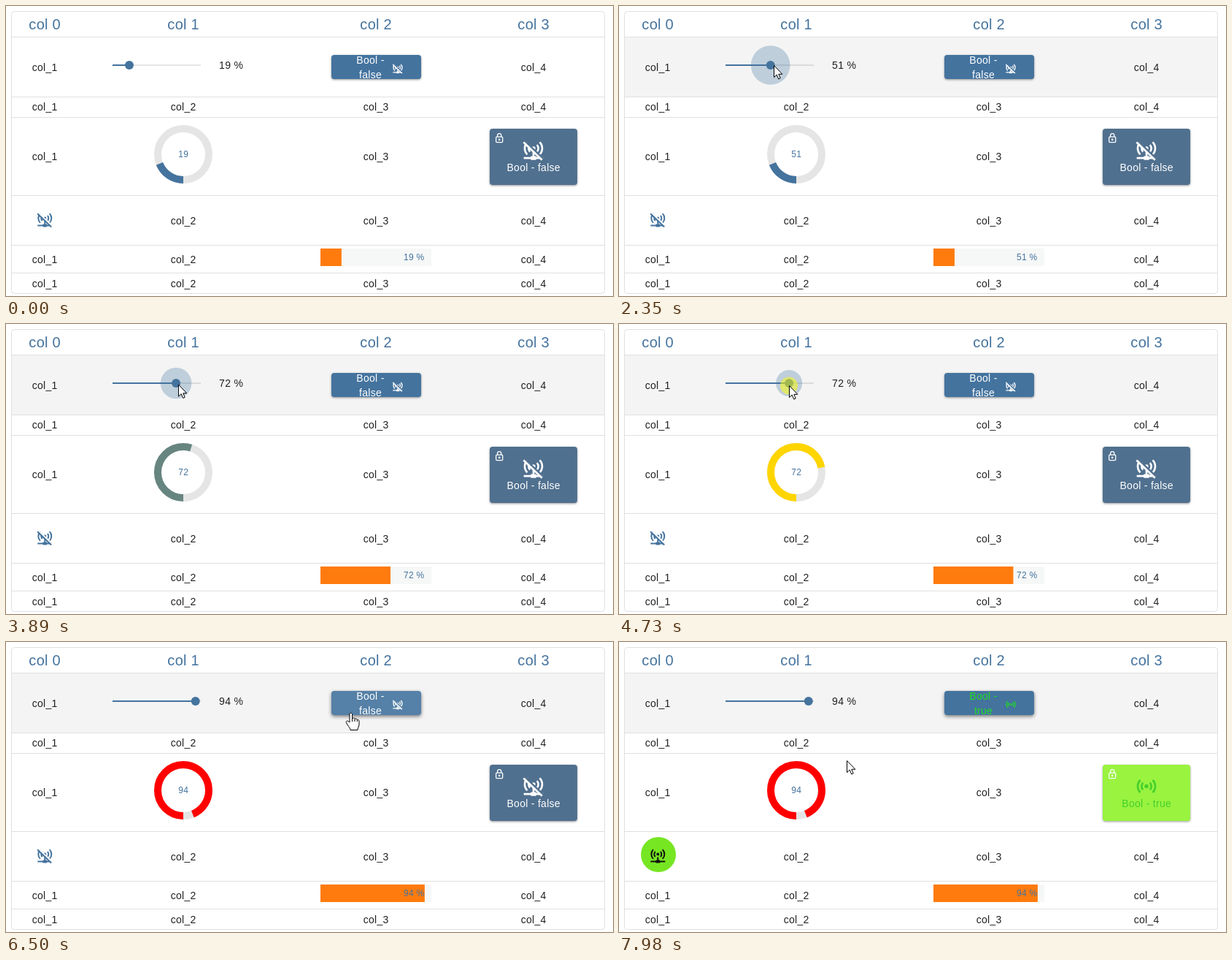
Recreate the animation shown at these times as an HTML page. Size 832x397 px, loop 8000 ms.

```html
<!DOCTYPE html>
<html>
<head>
<meta charset="utf-8">
<style>
html, body { margin: 0; width: 100%; height: 100%; overflow: hidden; background: #fff; }
svg { display: block; width: 832px; height: 397px; }
text { font: 14px "Liberation Sans", Arial, sans-serif; letter-spacing: .28px; fill: #212121; text-anchor: middle; }
.head { font-size: 20px; fill: #44739e; }
.small { font-size: 12px; fill: #44739e; }
.button text { fill: currentColor; }
.button { color: #fff; }
.button > rect:first-child { filter: drop-shadow(0 1px 1.5px rgba(0,0,0,.4)); }
.raised > rect:first-child { filter: drop-shadow(0 2px 2.5px rgba(0,0,0,.5)); }
</style>
</head>
<body>
<svg viewBox="0 0 832 397">
  <defs>
    <g id="waves" fill="none" stroke="currentColor" stroke-width="2">
      <path d="M5.64 3.64A9 9 0 0 0 5.64 16.36M18.36 3.64A9 9 0 0 1 18.36 16.36M8.46 6.46A5 5 0 0 0 8.46 13.54M15.54 6.46A5 5 0 0 1 15.54 13.54"/>
      <circle cx="12" cy="10" r="2" fill="currentColor" stroke="none"/>
    </g>
    <g id="network">
      <use href="#waves"/>
      <path d="M11 14V18H10A1 1 0 0 0 9 19H2V21H9A1 1 0 0 0 10 22H14A1 1 0 0 0 15 21H22V19H15A1 1 0 0 0 14 18H13V14Z" fill="currentColor"/>
    </g>
    <mask id="gap" maskUnits="userSpaceOnUse" x="0" y="0" width="24" height="24">
      <rect width="24" height="24" fill="#fff"/>
      <path d="M3 2.5L23 21.5" stroke="#000" stroke-width="2"/>
    </mask>
    <g id="off">
      <use href="#network" mask="url(#gap)"/>
      <path d="M1.8 3.7L20.8 22" stroke="currentColor" stroke-width="2"/>
    </g>
    <g id="on"><use href="#waves" y="2"/></g>
  </defs>

  <rect id="hoverRow" x="8" width="812" fill="#f4f4f4"/>
  <g id="table" fill="none" stroke="#e0e0e0">
    <rect x="7.5" y="7.5" width="813" height="386" rx="4"/>
    <path d="M8 42.5H820M8 124.5H820M8 152.5H820M8 259.5H820M8 327.5H820M8 365.5H820"/>
  </g>
  <g id="labels"></g>

  <rect x="146" y="80" width="121" height="2" fill="#000" opacity=".1"/>
  <rect id="track" x="146" y="80" height="2" fill="#44739e"/>
  <circle id="halo" cy="81" fill="#44739e" opacity=".3"/>
  <circle id="thumb" cy="81" r="6" fill="#44739e"/>
  <text id="sliderText" x="308.6" y="86"></text>

  <g id="toggle" class="button">
    <rect x="446" y="67" width="123" height="33" rx="4" fill="#44739e"/>
    <rect id="tint" x="446" y="67" width="123" height="33" rx="4" fill="#fff" opacity=".09"/>
    <circle id="ripple" cx="473" cy="97" fill="#fff" clip-path="inset(0)"/>
    <text x="499.5" y="79">Bool -</text>
    <text class="state" x="499.5" y="99"></text>
    <use class="icon" transform="translate(529 77.5) scale(.667)"/>
  </g>

  <circle cx="243" cy="203" r="35" fill="none" stroke="#e5e5e5" stroke-width="10"/>
  <circle id="gauge" cx="243" cy="203" r="35" fill="none" stroke-width="10" pathLength="100" transform="rotate(90 243 203)"/>
  <text id="gaugeText" class="small" x="243.3" y="207"></text>

  <g id="card" class="button">
    <rect id="cardBack" x="663" y="168" width="120" height="77" rx="4"/>
    <g fill="none" stroke="#fff" stroke-width="1.3">
      <rect x="671.7" y="179.2" width="9" height="7.4" rx="1"/>
      <path d="M673.6 179V177.2a2.6 2.6 0 0 1 5.2 0V179"/>
      <circle cx="676.2" cy="182.9" r=".7" fill="#fff"/>
    </g>
    <use class="icon" transform="translate(707 181.5) scale(1.333)"/>
    <text class="state" x="723.2" y="226"></text>
  </g>

  <circle id="lamp" cx="54" cy="291" r="24" fill="#76e622"/>
  <use id="lampIcon" transform="translate(41.3 280.5)"/>

  <rect x="431" y="332" width="152" height="24" fill="#f6f7f7"/>
  <rect id="bar" x="431" y="332" height="24" fill="#ff7b0d"/>
  <text id="barText" class="small" x="573.5" y="348" style="text-anchor:end"></text>

  <circle id="press" r="12" fill="#ff0" opacity=".5"/>
  <g id="cursor" fill="#fff" stroke="#000" stroke-linejoin="round">
    <path id="arrow" d="M.5 .5V16.6L4.2 13.1L6.7 19L9.2 17.9L6.8 12.3H11.8Z"/>
    <path id="hand" d="M-2 13V2C-2 -.2 1.6 -.2 1.6 2V8C2 6.5 5 6.7 5 8.6C5.5 7.4 8.3 7.8 8.3 9.7C9 8.8 11 9.3 11 11.5V16C11 19 9 20 9 23.5H-1C-1 21 -3 19.5 -4.5 17L-6.6 13.6C-7.5 11.5 -5 10.2 -3.6 11.7Z M1.6 8V12M5 9V12M8.3 10V12"/>
  </g>
</svg>
<script>
const $ = id => document.getElementById(id);
const set = (el, attrs) => { for (const k in attrs) el.setAttribute(k, attrs[k]); };
const columns = [53.2, 243.2, 507.2, 723.2];
const rowEdges = [43, 125, 153, 260, 328, 366, 393];
const baselines = [89, 143, 211, 299, 352, 385];
const widgets = ['0,1', '0,2', '2,1', '2,3', '3,0', '4,2'];

let labels = columns.map((x, c) => `<text class="head" x="${x}" y="32">col ${c}</text>`).join('');
baselines.forEach((y, r) => columns.forEach((x, c) => {
  if (!widgets.includes(`${r},${c}`)) labels += `<text x="${x}" y="${y}">col_${c + 1}</text>`;
}));
$('labels').innerHTML = labels;

// Each key is [time, value, value...]; values between keys are linear.
function tween(keys, t, i = 1) {
  const n = keys.findIndex(k => k[0] > t);
  if (n < 0) return keys[keys.length - 1][i];
  if (n === 0) return keys[0][i];
  const a = keys[n - 1], b = keys[n];
  return a[i] + (b[i] - a[i]) * (t - a[0]) / (b[0] - a[0]);
}
const smooth = p => { p = Math.min(1, Math.max(0, p)); return p * p * (3 - 2 * p); };

const slider = [[1620, 19], [1880, 47], [2030, 51], [2930, 51], [3120, 55], [3190, 55], [3500, 72], [4740, 72], [5040, 94]];
const halo = [[1060, 0], [1360, 18], [1560, 18], [1860, 27], [2345, 27], [2645, 18], [2870, 18], [3120, 27],
  [3700, 27], [4000, 18], [4730, 18], [5000, 27], [5415, 27], [5700, 18], [6190, 18], [6400, 0]];
const pointer = [[220, 440, 347], [1020, 190, 91], [1250, 173, 81], [1620, 173, 81], [1880, 207, 81], [2030, 212, 81],
  [2930, 212, 81], [3120, 216, 81], [3190, 216, 81], [3500, 237, 82], [3750, 237, 82], [4300, 233, 84], [4740, 233, 84],
  [5040, 260, 83], [6190, 260, 83], [6440, 473, 97], [7830, 473, 97], [7975, 312, 162]];
const presses = [[1560, 2345], [2870, 3700], [4725, 5415], [6720, 6880]];
const blue = [68, 115, 158], yellow = [255, 213, 0], red = [255, 0, 0];
const updates = [
  { at: 2345, from: 19, to: 51, colors: [blue, blue] },
  { at: 3725, from: 51, to: 72, colors: [blue, yellow] },
  { at: 5410, from: 72, to: 94, colors: [yellow, red] }
];

function draw(t) {
  const value = tween(slider, t), thumbX = 146 + 1.21 * value;
  set($('track'), { width: thumbX - 146 });
  set($('thumb'), { cx: thumbX });
  set($('halo'), { cx: thumbX, r: tween(halo, t) });
  $('sliderText').textContent = Math.round(value) + ' %';

  const u = updates.filter(u => t >= u.at).pop() || updates[0];
  const mix = (a, b, p) => a + (b - a) * p;
  const p = smooth((t - u.at) / 600);
  const color = u.colors[0].map((c, i) => Math.round(mix(c, u.colors[1][i], p)));
  const shown = t >= u.at ? u.to : u.from;
  set($('gauge'), { stroke: `rgb(${color})`, 'stroke-dasharray': `${mix(u.from, u.to, p)} 100` });
  set($('bar'), { width: 1.52 * mix(u.from, u.to, smooth((t - u.at) / 300)) });
  $('gaugeText').textContent = shown;
  $('barText').textContent = shown + ' %';

  const x = tween(pointer, t), y = tween(pointer, t, 2);
  const overToggle = x > 446 && y > 67 && y < 100;
  set($('cursor'), { transform: `translate(${x} ${y})`, visibility: t < 220 ? 'hidden' : 'visible' });
  set($('arrow'), { display: overToggle ? 'none' : 'inline' });
  set($('hand'), { display: overToggle ? 'inline' : 'none' });
  set($('press'), { cx: x, cy: y + .5, visibility: presses.some(([a, b]) => t >= a && t < b) ? 'visible' : 'hidden' });

  const lagY = tween(pointer, t - 100, 2), row = rowEdges.findIndex(e => e > lagY) - 1;
  set($('hoverRow'), { y: rowEdges[row], height: rowEdges[row + 1] - rowEdges[row] - 1, opacity: t < 320 ? 0 : 1 });

  set($('tint'), { visibility: overToggle ? 'visible' : 'hidden' });
  set($('toggle'), { class: t > 6400 ? 'button raised' : 'button' });
  const wave = (t - 6720) / 400;
  set($('ripple'), { r: wave > 0 && wave < 1 ? 3 : 0, opacity: .2 * (1 - wave) });

  const on = t >= 6840;
  $('toggle').style.color = on ? '#2d2' : '#fff';
  $('card').style.color = on ? '#45cf2c' : '#fff';
  set($('cardBack'), { fill: on ? '#99f33f' : '#50708f' });
  document.querySelectorAll('.icon').forEach(el => set(el, { href: on ? '#on' : '#off' }));
  const [toggleState, cardState] = document.querySelectorAll('.state');
  toggleState.textContent = on;
  cardState.textContent = 'Bool - ' + on;
  set($('lamp'), { visibility: on ? 'visible' : 'hidden' });
  set($('lampIcon'), { href: on ? '#network' : '#off', color: on ? '#111' : '#44739e' });
}

function frame() {
  draw(performance.now() % 8000);
  requestAnimationFrame(frame);
}
frame();
</script>
</body>
</html>
```
